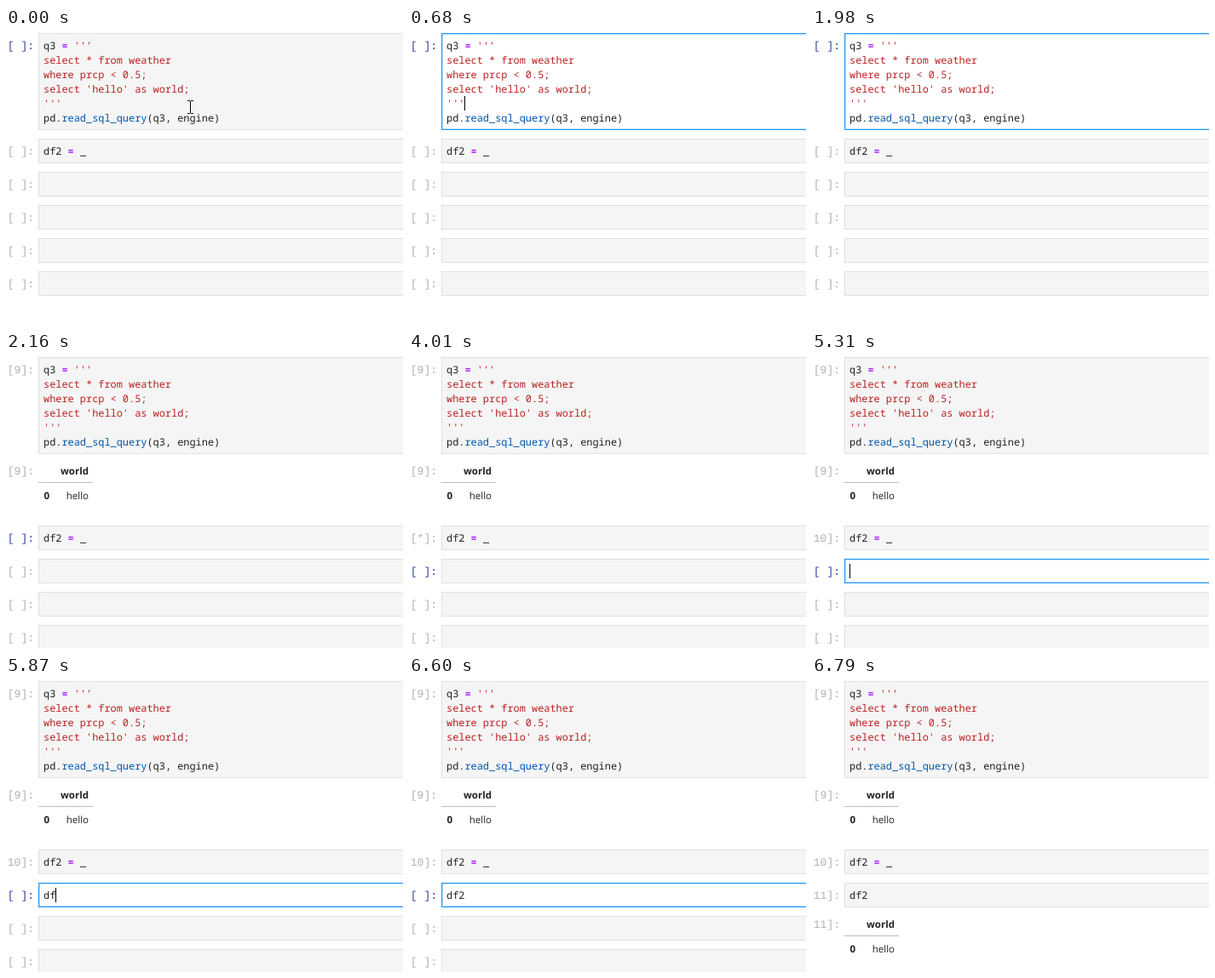
Write an HTML page that moves like this. It is 466 px wide and 348 px high and loops after 8000 ms.

```html
<!DOCTYPE html>
<html lang="en">
<head>
<meta charset="utf-8">
<style>
html, body { margin: 0; height: 100%; overflow: hidden; background: #fff; }
svg { display: block; }
text { white-space: pre; text-rendering: geometricPrecision; }
.code { font: 11.91px "Noto Sans Mono", monospace; fill: #212121; }
.prompt { font: 13px "Liberation Mono", monospace; fill: #b0b0b0; text-anchor: end; }
.active { fill: #303f9f; }
.table { font: 11.5px "Open Sans", sans-serif; fill: #212121; text-anchor: end; }
.bold { font-weight: bold; }
.str { fill: #ba2121; }
.op { fill: #a2f; font-weight: bold; }
.prop { fill: #05a; }
</style>
</head>
<body>
<svg id="stage" width="466" height="348" viewBox="0 0 466 348"></svg>
<script>
const LOOP = 8000, LINE = 17, CHAR = 7.147;
const stage = document.getElementById('stage');

const span = (cls, s) => `<tspan class="${cls}">${s}</tspan>`;
const text = (cls, x, y, s) => `<text class="${cls}" x="${x}" y="${y}">${s}</text>`;
const rect = (x, y, w, h, fill) =>
  `<rect x="${x}" y="${y}" width="${w}" height="${h}" fill="${fill}"/>`;

const QUERY = [
  `q3 ${span('op', '=')} ${span('str', "'''")}`,
  ...['select * from weather', 'where prcp &lt; 0.5;', "select 'hello' as world;", "'''"]
    .map(s => span('str', s)),
  `pd.${span('prop', 'read_sql_query')}(q3, engine)`
];
const ASSIGN = [`df2 ${span('op', '=')} _`];

const prompt = (y, label, active) =>
  text('prompt' + (active ? ' active' : ''), 33, y, `[${label}]:`);

function cell(y, lines, label = ' ', active = false, focused = false) {
  const h = lines.length * LINE + 12;
  const frame = (inset, style) =>
    `<rect x="${38.5 + inset}" y="${y + .5 + inset}" width="500" height="${h - 1 - 2 * inset}" ${style}/>`;
  return (focused
    ? frame(0, 'fill="#fff" stroke="#2196f3"') + frame(1, 'fill="none" stroke="#2196f3" opacity=".3"')
    : frame(0, 'fill="#f5f5f5" stroke="#e0e0e0"')) +
    prompt(y + 19, label, active) +
    lines.map((s, i) => text('code', 44, y + 19 + i * LINE, s)).join('');
}

const output = (y, label) =>
  prompt(y + 24, label) +
  text('table bold', 97, y + 24, 'world') +
  rect(38, y + 33, 64, 1, '#bdbdbd') +
  text('table bold', 51, y + 53, '0') +
  text('table', 97, y + 53, 'hello');

const caret = (col, y) => rect(Math.floor(44 + col * CHAR), y, 1, LINE, '#000');

const pointer = (x, y) =>
  `<path d="M${x} ${y + .5}h3m1 0h3M${x + 3.5} ${y + 1}v14M${x} ${y + 15.5}h3m1 0h3" stroke="#000" fill="none"/>`;

function beforeRun(t) {
  const focused = t >= 500;
  let s = cell(6, QUERY, ' ', true, focused) + cell(130, ASSIGN);
  for (let y = 169; y < 300; y += 39) s += cell(y, ['']);
  if (t < 500) s += pointer(213, 85);
  else if (t < 680) s += pointer(218, 86);
  if (focused && t < 1050 || t >= 1430 && t < 1980) s += caret(3, 80);
  return s;
}

function afterRun(t) {
  const label = t < 4010 ? ' ' : t < 4200 ? '*' : '10';
  let s = cell(6, QUERY, 9) + output(120, 9) + cell(204, ASSIGN, label, t < 4010);
  if (t >= 6790) return s + cell(243, ['df2'], 11) + output(272, 11);
  const typed = [5680, 5870, 6050].filter(at => t >= at).length;
  const focused = t >= 5310;
  s += cell(243, ['df2'.slice(0, typed)], ' ', t >= 4010, focused);
  if (focused && t < 6600) s += caret(typed, 249);
  return s + cell(282, ['']) + cell(321, ['']);
}

let shown = '';
const start = performance.now();
function tick() {
  const t = (performance.now() - start) % LOOP;
  const next = t < 2160 ? beforeRun(t) : afterRun(t);
  if (next !== shown) stage.innerHTML = shown = next;
  requestAnimationFrame(tick);
}
tick();
</script>
</body>
</html>
```
